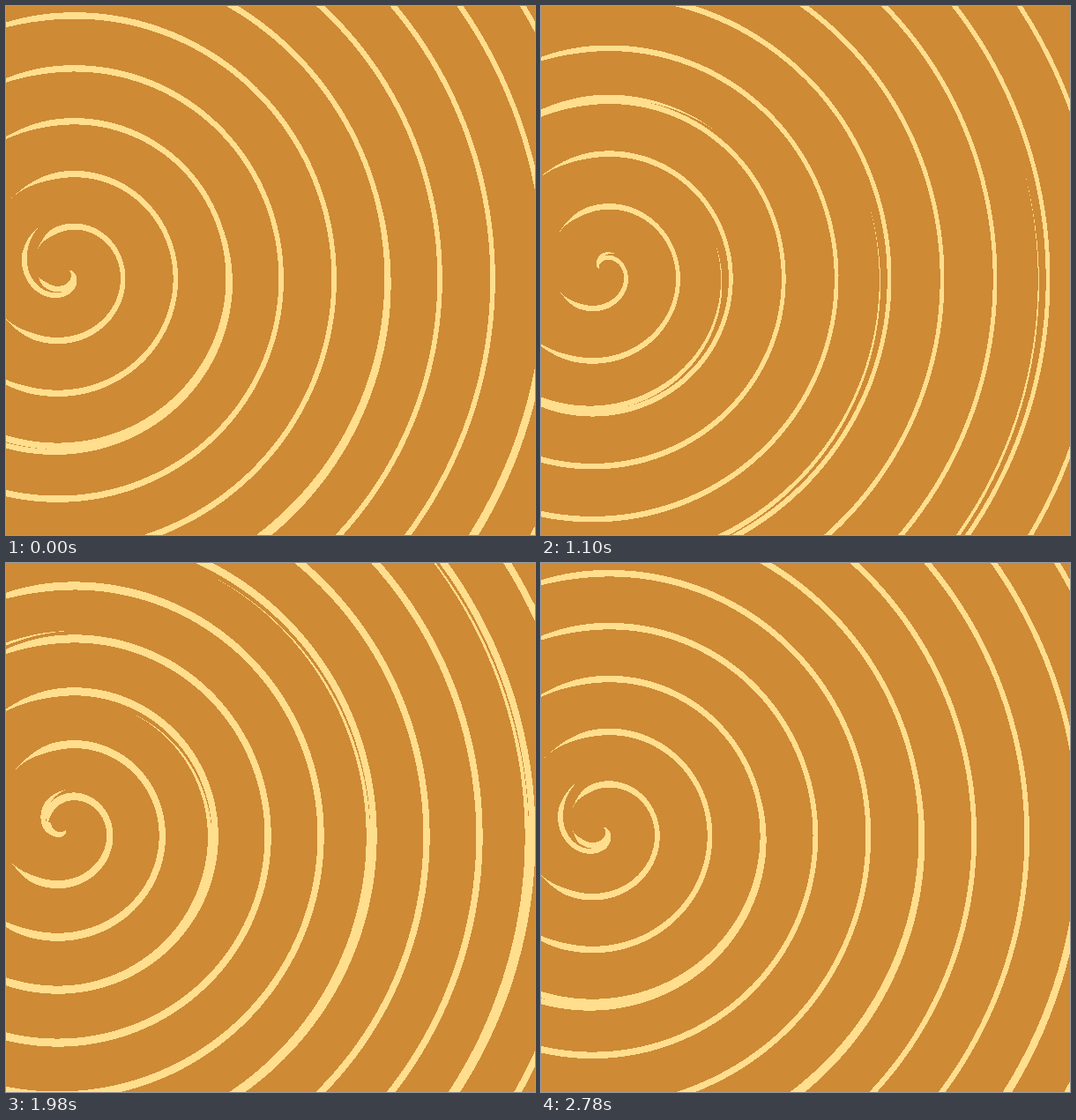
Animation of 600 by 600 pixels, one loop 2.8 s. Source, as an HTML page:

```html
<!DOCTYPE html>
<html lang="en">
<head>
<meta charset="utf-8">
<title>Spiral</title>
<style>
  html, body { margin: 0; width: 100%; height: 100%; overflow: hidden; background: #ce8a35; }
  svg { display: block; width: 100vw; height: 100vh; }
  path { fill: #ffde8e; shape-rendering: crispEdges; }
</style>
</head>
<body>
<svg viewBox="0 0 600 600"><path id="coil"/><path id="strands"/></svg>
<script>
const LOOP = 2800, STEPS = 60;
const COIL_PITCH = 60, STRAND_PITCH = 80, STRAND_GAP = 180;
const CX = 68, CY = 300, REACH = 630;
const RAD = Math.PI / 180;
const coil = document.getElementById('coil');
const strands = document.getElementById('strands');

const clamp = (v, lo, hi) => Math.min(hi, Math.max(lo, v));
const smooth = v => { v = clamp(v, 0, 1); return v * v * (3 - 2 * v); };

// Linear interpolation through [x, y] pairs
function lerpKeys(keys, x) {
  let i = 1;
  while (i < keys.length - 1 && x > keys[i][0]) i++;
  const [x0, y0] = keys[i - 1], [x1, y1] = keys[i];
  return y0 + (y1 - y0) * clamp((x - x0) / (x1 - x0), 0, 1);
}

// Steps come in groups of three lasting 20, 100 and 20 ms
function stepAt(ms) {
  const u = ms % 140;
  return 3 * Math.floor(ms / 140) + (u < 20 ? 0 : u < 120 ? 1 : 2);
}

// Closed outline of a band; angles in degrees, clockwise from the right
function band(from, to, radius, width) {
  const outer = [], inner = [];
  const put = (list, r, a) =>
    list.push((CX + r * Math.cos(a)).toFixed(2) + ' ' + (CY + r * Math.sin(a)).toFixed(2));
  const n = Math.ceil((to - from) / 2);
  for (let i = 0; i <= n; i++) {
    const deg = from + (to - from) * i / n;
    const r = radius(deg), h = width(deg, r) / 2;
    put(outer, r + h, deg * RAD);
    put(inner, Math.max(0, r - h), deg * RAD);
  }
  return 'M' + outer.concat(inner.reverse()).join('L') + 'Z';
}

function coilPath(k) {
  const base = 64 + k + 2 * Math.exp(-(((k - 45) / 9) ** 2));
  const weight = 5.7 - 1.6 * Math.cos((k - 14) / STEPS * 2 * Math.PI);
  const radius = deg => base + deg * COIL_PITCH / 360;
  const width = (deg, r) => {
    const turn = ((deg - 7) % 360 + 360) % 360;
    const fromLeft = Math.abs(turn - 180);
    const gap = clamp((r - 22) * 1.6, 0, 33) + clamp((r - 60) * 0.3, 0, 13);
    const open = r < 22 ? 1 : smooth((fromLeft - gap) / 36 + 0.04);
    const side = 1.8 * Math.sin(deg * RAD) ** 2;
    return (weight + side) * open * Math.min(1, r / 10);
  };
  const degAt = r => (r - base) * 360 / COIL_PITCH;
  return band(degAt(3), degAt(REACH), radius, width);
}

// Angular length of a loose strand over its life
const SPAN = [[6, 30], [10, 75], [23, 323], [49, 335], [60, 310], [70, 127], [84, 30]];

// Loose strands turn with the coil but are wound wider, so they drift across it
function strandPath(age) {
  if (age < 6 || age > 84) return '';
  const end = 352 - 1.87 * age, span = lerpKeys(SPAN, age);
  let d = '';
  for (let r0 = 105.5 - STRAND_GAP; r0 < REACH; r0 += STRAND_GAP) {
    const radius = deg => r0 + STRAND_PITCH * (deg / 360 + age / STEPS);
    const center = (4 - radius(0)) * 360 / STRAND_PITCH;
    const start = Math.max(end - span, center);
    if (start >= end) continue;
    const width = deg => 6.2 * Math.min(1, (end - deg) / 40, (deg - start) / (span * 0.25));
    d += band(start, end, radius, width);
  }
  return d;
}

let shown = -1;
function draw(ms) {
  const k = stepAt(ms % LOOP);
  if (k === shown) return;
  shown = k;
  coil.setAttribute('d', coilPath(k));
  strands.setAttribute('d', strandPath(k) + strandPath(k + STEPS));
}

const begin = performance.now();
function tick() {
  draw(performance.now() - begin);
  requestAnimationFrame(tick);
}
draw(0);
requestAnimationFrame(tick);
</script>
</body>
</html>
```
